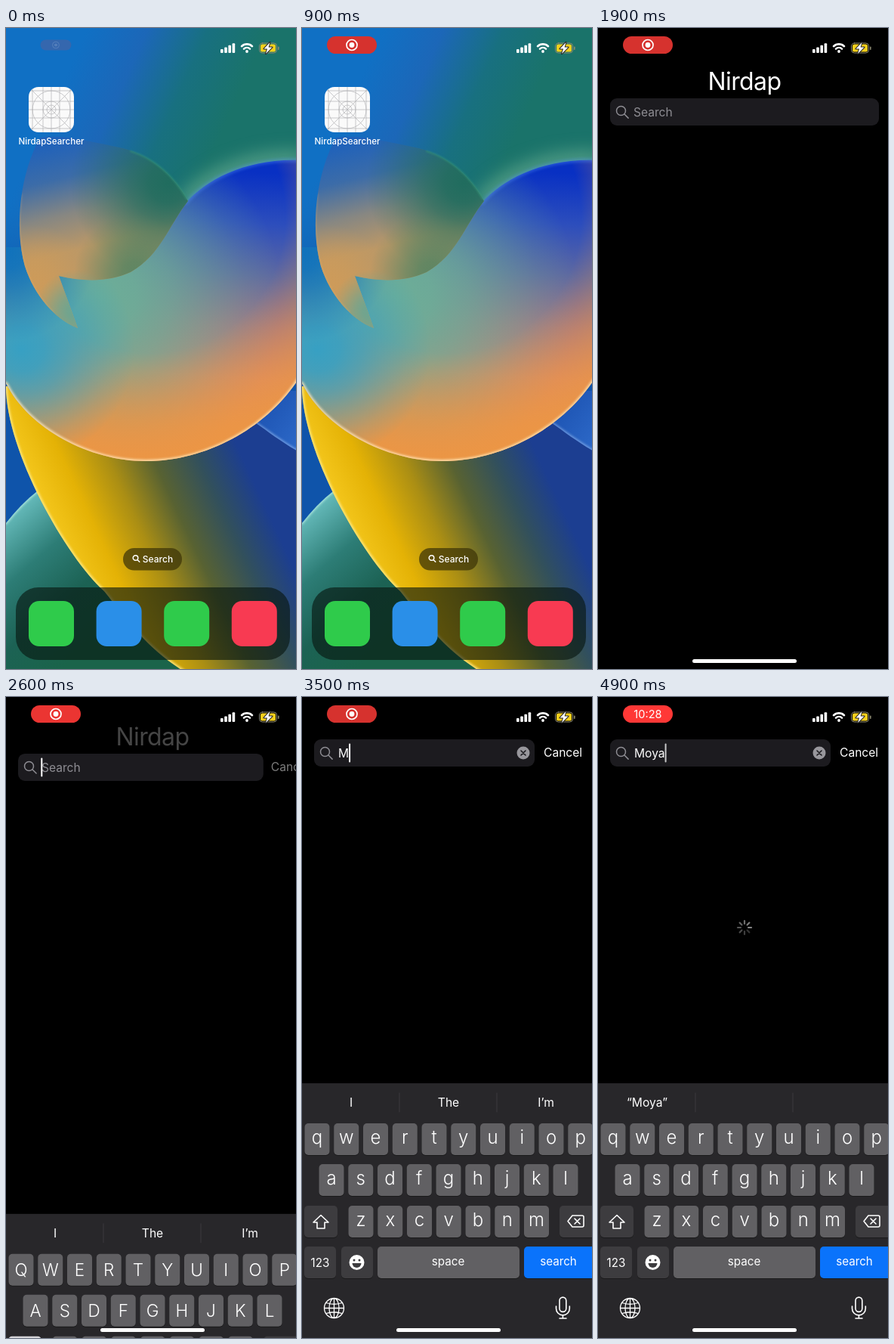
Write an HTML page with a canvas that moves like this. It is 384 px wide and 848 px high and loops after 5000 ms.

```html
<!DOCTYPE html>
<html lang="en">
<head>
<meta charset="utf-8">
<title>App launch and search</title>
<style>
html, body { margin: 0; width: 100%; height: 100%; overflow: hidden; background: #000; }
canvas { display: block; width: 384px; height: 848px; }
</style>
</head>
<body>
<canvas id="stage" width="384" height="848"></canvas>
<script>
const W = 384, H = 848, LOOP = 5000;
const LAUNCH = 1050, FOCUS = 2510, SPIN = 4700, CLOCK = 4600;
const TYPED = [['M', 3400], ['o', 3800], ['y', 4080], ['a', 4420]];
const HINTS = [['I', 'The', 'I’m'], ['“M”', 'My', 'Me'], ['“Mo”', 'More', 'Mom'],
  ['“Moy”', 'Mot', 'Most'], ['“Moya”', '', '']];
const ROWS = [['qwertyuiop', 3.5, 53], ['asdfghjkl', 22.5, 107], ['zxcvbnm', 61.5, 162]];
const PITCH = 38.75, KEY = '#616063', SPECIAL = '#3d3c3f', GRAY = '#8e8d93';

const stage = document.getElementById('stage').getContext('2d');
let c = stage;

const clamp = x => Math.min(1, Math.max(0, x));
const mix = (a, b, p) => a + (b - a) * p;
const spring = (s, a) => s <= 0 ? 0 : 1 - (1 + a * s) * Math.exp(-a * s);

function box(x, y, w, h, r, color) {
  c.beginPath();
  c.roundRect(x, y, w, h, r);
  if (color) { c.fillStyle = color; c.fill(); }
}
function disc(x, y, r, color) {
  c.beginPath();
  c.arc(x, y, r, 0, 7);
  c.fillStyle = color;
  c.fill();
}
function line(d, color, width) {
  c.strokeStyle = color;
  c.lineWidth = width;
  c.lineCap = c.lineJoin = 'round';
  c.stroke(new Path2D(d));
}
function text(s, x, y, size, color = '#fff', align = 'center', weight = 400) {
  c.font = `${weight} ${size}px Inter, Roboto, sans-serif`;
  c.fillStyle = color;
  c.textAlign = align;
  c.fillText(s, x, y);
}

// Gradients: evenly spaced stops along a line, a soft spot, a soft outer ring.
function ramp(x0, y0, x1, y1, ...colors) {
  const g = c.createLinearGradient(x0, y0, x1, y1);
  colors.forEach((rgb, i) => g.addColorStop(i / (colors.length - 1), `rgba(${rgb})`));
  return g;
}
function spot(x, y, r, rgb, a = 1) {
  const g = c.createRadialGradient(x, y, 0, x, y, r);
  [1, .92, .72, .46, .2, 0].forEach((v, i) => g.addColorStop(i / 5, `rgba(${rgb},${a * v})`));
  return g;
}
function ring(x, y, r0, r1, rgb) {
  const g = c.createRadialGradient(x, y, r0, x, y, r1);
  g.addColorStop(0, `rgba(${rgb},0)`);
  g.addColorStop(1, `rgba(${rgb},1)`);
  return g;
}
function paint(fills) {
  for (const f of fills) {
    c.fillStyle = f;
    c.fillRect(0, 0, W, H);
  }
}
function glow(d, color, width, blur) {
  c.save();
  c.filter = `blur(${blur}px)`;
  line(d, color, width);
  c.restore();
}
function shape(d, fills, rim, color, width) {
  c.save();
  c.clip(new Path2D(d));
  paint(fills);
  glow(rim, color, width, 1.5);
  c.restore();
}

function paintWallpaper() {
  const cv = document.createElement('canvas');
  cv.width = W;
  cv.height = H;
  c = cv.getContext('2d');
  const bodyTop = 'M390 175C320 172 265 200 238 232';
  const bodyBottom = 'M0 470C30 530 110 573 185 573C270 573 350 525 390 460';
  const inner = 'C215 262 205 300 165 323C135 337 100 335 70 328';
  paint([
    ramp(90, 40, 290, 130, '16,112,196', '28,103,184', '24,112,128', '26,115,106'),
    ramp(0, 230, 0, 500, '14,110,188,0', '15,84,170,1', '15,84,170,1')
  ]);
  shape('M0 655C12 640 25 625 45 610L260 860H0Z', [
    ramp(0, 650, 130, 800, '100,185,185', '45,125,118', '28,98,84', '26,100,74')
  ], 'M0 655C12 640 25 625 45 610', 'rgba(190,240,230,.8)', 3);
  shape('M0 474C0 560 80 700 130 745C170 795 190 825 250 860H390V480Z', [
    ramp(55, 655, 300, 540, '245,200,30', '228,178,5', '170,142,20', '88,98,50', '50,80,92', '28,62,145')
  ], 'M0 474C0 560 80 700 130 745C170 795 190 825 250 860', 'rgba(255,232,130,.9)', 4);
  shape('M330 522C350 536 365 548 390 562V480H330Z', [ramp(330, 520, 384, 560, '30,85,180', '45,105,200')],
    'M330 522C350 536 365 548 390 562', 'rgba(150,185,240,.7)', 3);
  glow(bodyTop, 'rgba(125,190,155,.75)', 18, 12);
  shape(bodyTop + 'L70 290H0V470C30 530 110 573 185 573C270 573 350 525 390 460Z', [
    ramp(320, 190, 300, 530, '8,48,195', '45,78,188', '95,104,160', '165,120,130', '215,136,105', '230,145,80'),
    spot(125, 355, 240, '108,174,152'),
    ring(190, 250, 180, 325, '236,150,68'),
    spot(20, 425, 150, '55,160,195'),
    spot(0, 295, 120, '16,114,188')
  ], bodyBottom, 'rgba(255,232,185,.85)', 4);
  glow(bodyTop, 'rgba(85,150,250,.6)', 3, 2);
  shape('M45 145C20 190 10 260 25 315C38 355 65 385 95 397L70 328C100 335 135 337 165 323C205 300 215 262 241 229C220 190 185 165 150 158C110 150 75 140 45 145Z', [
    ramp(70, 150, 105, 290, '32,98,186', '60,108,168', '135,135,130', '188,152,102'),
    spot(215, 205, 130, '32,108,94'),
    spot(35, 340, 80, '205,155,90'),
    spot(170, 325, 80, '85,132,98', .9),
    spot(92, 375, 55, '108,165,145')
  ], 'M20 220C15 260 18 290 25 315C34 343 48 362 62 376', 'rgba(225,180,120,.4)', 2);
  glow('M165 163C195 172 222 195 239 226', 'rgba(50,150,120,.7)', 2, 1);
  c = stage;
  return cv;
}
const wallpaper = paintWallpaper();

function magnifier(x, y, r, color, w) {
  const k = r * .75, e = r * 1.6;
  line(`M${x - r} ${y}a${r} ${r} 0 1 0 ${2 * r} 0a${r} ${r} 0 1 0 ${-2 * r} 0M${x + k} ${y + k}L${x + e} ${y + e}`, color, w);
}

function appIcon(x, y, w, h, r) {
  box(x, y, w, h, r, '#fafafa');
  c.save();
  c.clip();
  c.translate(x, y);
  c.scale(w / 60, h / 60);
  let d = 'M0 0L60 60M60 0L0 60';
  for (const v of [5, 19, 30, 41, 55]) d += `M${v} 0V60M0 ${v}H60`;
  for (const v of [6, 11, 25]) d += `M${30 - v} 30a${v} ${v} 0 1 0 ${2 * v} 0a${v} ${v} 0 1 0 ${-2 * v} 0`;
  line(d, '#b4b4b6', .7);
  c.restore();
}

function status(t, alpha) {
  const bright = clamp(.5 - 1.6 * Math.cos((t - 600) / 1600 * 2 * Math.PI));
  const grow = clamp(.15 + t / 300), s = mix(.55, 1, grow);
  c.save();
  c.globalAlpha = alpha * grow;
  c.translate(66, 22.5);
  c.scale(s, s);
  box(-33, -11.5, 66, 23, 11.5, `rgb(${mix(214, 255, bright)},${mix(50, 56, bright)},${mix(46, 54, bright)})`);
  if (t < CLOCK) {
    line('M-7 0a7 7 0 1 0 14 0a7 7 0 1 0 -14 0', '#fff', 1.7);
    disc(0, 0, 3.4, '#fff');
  } else text('10:28', 0, 5.2, 14.6);
  c.restore();
  c.save();
  c.globalAlpha = alpha;
  for (let i = 0; i < 4; i++) box(284 + i * 5.2, 28 - i * 2.6, 3.6, 5 + i * 2.6, 1, '#fff');
  line('M312 24.2a10 10 0 0 1 14 0M315 27.6a5.8 5.8 0 0 1 8 0', '#fff', 2.6);
  disc(319, 31, 1.9, '#fff');
  box(335.5, 20, 23, 13, 4);
  c.strokeStyle = '#8d8a72';
  c.lineWidth = 1;
  c.stroke();
  box(337, 21.5, 20, 10, 2.6, '#f5cf1c');
  box(360, 24.5, 1.6, 4.5, 1, '#8d8a72');
  const bolt = new Path2D('M349.5 19L341.5 27.5H346L344 34L352.5 25.5H347.6Z');
  c.strokeStyle = '#222';
  c.lineWidth = 2;
  c.stroke(bolt);
  c.fillStyle = '#fff';
  c.fill(bolt);
  c.restore();
}

function home(t, p) {
  c.save();
  if (p > 0) c.filter = `blur(${12 * p}px)`;
  const m = 20 * p;
  c.drawImage(wallpaper, -m, -m, W + 2 * m, H + 2 * m);
  c.globalAlpha = 1 - .3 * p;
  c.translate(W / 2, H / 2);
  c.scale(1 - .087 * p, 1 - .087 * p);
  c.translate(-W / 2, -H / 2);
  box(13, 740, 363, 96, 30, `rgba(8,22,16,${.62 * (1 - p)})`);
  ['#2fcb4b', '#2a8fe8', '#2fcb4b', '#f83a52'].forEach((color, i) => box(30 + i * 89.6, 758, 60, 60, 14, color));
  if (p === 0) appIcon(30, 78, 60, 60, 13);
  text('NirdapSearcher', 60, 154, 11.6, '#fff', 'center', 500);
  box(155, 688, 78, 29.5, 14.75, 'rgba(60,52,8,.72)');
  magnifier(171.5, 701, 3.3, '#fff', 1.5);
  text('Search', 201, 707, 12, '#fff', 'center', 500);
  c.restore();
  status(t, 1 - .95 * p);
}

function key(x, y, w, color) {
  box(x, y + 1, w, 42, 5, '#1a1a1b');
  box(x, y, w, 42, 5, color);
}

function popup(ch, x, y) {
  const m = x + 16.5;
  box(m - 29, y - 65, 58, 52, 10, KEY);
  c.fill(new Path2D(`M${m - 29} ${y - 26}C${m - 29} ${y - 6} ${m - 16.5} ${y - 14} ${m - 16.5} ${y + 6}V${y + 42}H${m + 16.5}V${y + 6}C${m + 16.5} ${y - 14} ${m + 29} ${y - 6} ${m + 29} ${y - 26}Z`));
  text(ch, m, y - 25, 34, '#fff', 'center', 300);
}

function keyboard(t, top) {
  const lower = t > 3500, any = t >= TYPED[0][1];
  const hints = HINTS[TYPED.filter(k => t >= k[1] + 150).length];
  const down = TYPED.find(k => t >= k[1] - 30 && t < k[1] + 100);
  let pressed;
  c.save();
  c.translate(0, top);
  c.fillStyle = '#28272a';
  c.fillRect(0, 0, W, H);
  line('M129 13V38M258 13V38', '#3c3b3f', 1);
  hints.forEach((s, i) => text(s, 65 + 129 * i, 31, 15.6));
  for (const [letters, left, y] of ROWS) {
    [...letters].forEach((ch, i) => {
      const x = left + PITCH * i;
      key(x, y, 33, KEY);
      text(lower ? ch : ch.toUpperCase(), x + 16.5, y + (lower ? 27 : 29), lower ? 24 : 22.5, '#fff', 'center', 300);
      if (down && down[0].toLowerCase() === ch) pressed = [down[0], x, y];
    });
  }
  key(3, 162, 44, lower ? SPECIAL : '#d4d3d7');
  const arrow = 'M25 174.5L35 184H30V192H20V184H15Z';
  line(arrow, lower ? '#fff' : '#000', 1.6);
  if (!lower) { c.fillStyle = '#000'; c.fill(new Path2D(arrow)); }
  key(341, 162, 50, SPECIAL);
  line('M358 175H371Q373 175 373 177V188Q373 190 371 190H358L352 182.5ZM361 179L368 186M368 179L361 186', '#fff', 1.6);
  key(3, 216, 42, SPECIAL);
  text('123', 24, 242.5, 15.2);
  key(52, 216, 42, SPECIAL);
  disc(72.5, 237, 10, '#fff');
  disc(69, 234, 1.5, SPECIAL);
  disc(76, 234, 1.5, SPECIAL);
  c.beginPath();
  c.arc(72.5, 238, 6, 0, Math.PI);
  c.fill();
  key(100, 216, 188, KEY);
  text('space', 193.5, 241, 15.2);
  key(294, 216, 98, any ? '#0a73fb' : SPECIAL);
  text('search', 339.5, 241, 15.2, any ? '#fff' : '#77767a');
  line('M29.5 297.5a13 13 0 1 0 26 0a13 13 0 1 0 -26 0M36 297.5a6.5 13 0 1 0 13 0a6.5 13 0 1 0 -13 0M42.5 284.5V310.5M29.5 297.5H55.5M32 290.5Q42.5 294 53 290.5M32 304.5Q42.5 301 53 304.5', '#fff', 1.3);
  line('M341 287.5a4.4 4.4 0 0 1 8.8 0V298a4.4 4.4 0 0 1 -8.8 0ZM336.5 295V298a8.9 8.9 0 0 0 17.8 0V295M345.4 307V311M341 311H350', '#fff', 1.6);
  if (pressed) popup(...pressed);
  c.restore();
}

function spinner(t) {
  const turn = (t - SPIN) / 125 - 1;
  for (let i = 0; i < 8; i++) {
    const a = i * Math.PI / 4, age = (((turn - i) % 8) + 8) % 8;
    const x = Math.cos(a), y = Math.sin(a), v = Math.round(mix(140, 45, age / 8));
    line(`M${194 + 5 * x} ${305 + 5 * y}L${194 + 9 * x} ${305 + 9 * y}`, `rgb(${v},${v},${v})`, 2.2);
  }
}

function app(t, height) {
  const show = clamp((t - 1100) / 290), k = spring((t - FOCUS) / 1000, 18);
  const done = TYPED.filter(e => t >= e[1]), query = done.map(e => e[0]).join('');
  const y = mix(93, 56, k), mid = y + 18;
  c.globalAlpha = show * clamp(1 - 1.5 * k);
  c.letterSpacing = '-0.6px';
  text('Nirdap', 194, 82 - 37 * k, 32);
  c.letterSpacing = '0px';
  c.globalAlpha = show;
  box(16, y, mix(356, 292, k), 36, 9, '#1c1b1f');
  magnifier(30.5, mid - 1.5, 6, GRAY, 1.5);
  text(query || 'Search', query ? 48 : 47, mid + 5.7, 15.6, query ? '#fff' : GRAY, 'left');
  if (k > .3) {
    const since = t - (done.length ? done[done.length - 1][1] : FOCUS);
    const x = query ? 48 + c.measureText(query).width : 46.3;
    c.globalAlpha = since < 250 ? 1 : clamp(.5 + 2.2 * Math.cos((since - 250) / 1000 * 2 * Math.PI));
    box(x, mid - 12.5, 2, 25, 1, '#fff');
  }
  c.globalAlpha = show * k;
  text('Cancel', 320 + 60 * (1 - k), mid + 5.2, 15.6, '#fff', 'left');
  c.globalAlpha = 1;
  if (query) {
    disc(293, mid, 8.5, '#98979c');
    line(`M290 ${mid - 3}l6 6m0 -6l-6 6`, '#1c1b1f', 1.6);
  }
  if (t >= SPIN) spinner(t);
  if (k > 0) keyboard(t, mix(H, 511, k));
  c.globalAlpha = show;
  box(125, height - 13, 138, 5, 2.5, '#fff');
  status(t, clamp((t - 1100) / 150));
  c.globalAlpha = 1;
}

function draw(t) {
  c.clearRect(0, 0, W, H);
  const p = spring((t - LAUNCH) / 1000, 14.2), open = t > 1750;
  if (!open) home(t, p);
  if (p === 0) return;
  c.fillStyle = `rgba(0,0,0,${clamp((t - LAUNCH) / 500)})`;
  c.fillRect(0, 0, W, H);
  // The window's centre runs slightly ahead of its height.
  const w = open ? W : mix(60, W, p), h = open ? H : mix(60, H, p ** 1.56);
  const x = open ? 0 : mix(60, W / 2, p ** .93) - w / 2, y = open ? 0 : mix(108, H / 2, p ** 1.05) - h / 2;
  const r = open ? 0 : mix(13, 56, p), s = w / W;
  c.save();
  box(x, y, w, h, r, '#000');
  c.clip();
  c.save();
  c.translate(x, y);
  c.scale(s, s);
  app(t, h / s);
  c.restore();
  c.globalAlpha = 1 - clamp((t - LAUNCH) / 130);
  if (c.globalAlpha > 0) appIcon(x, y, w, h, r);
  c.restore();
}

const start = performance.now();
function tick() {
  draw((performance.now() - start) % LOOP);
  requestAnimationFrame(tick);
}
tick();
</script>
</body>
</html>
```
